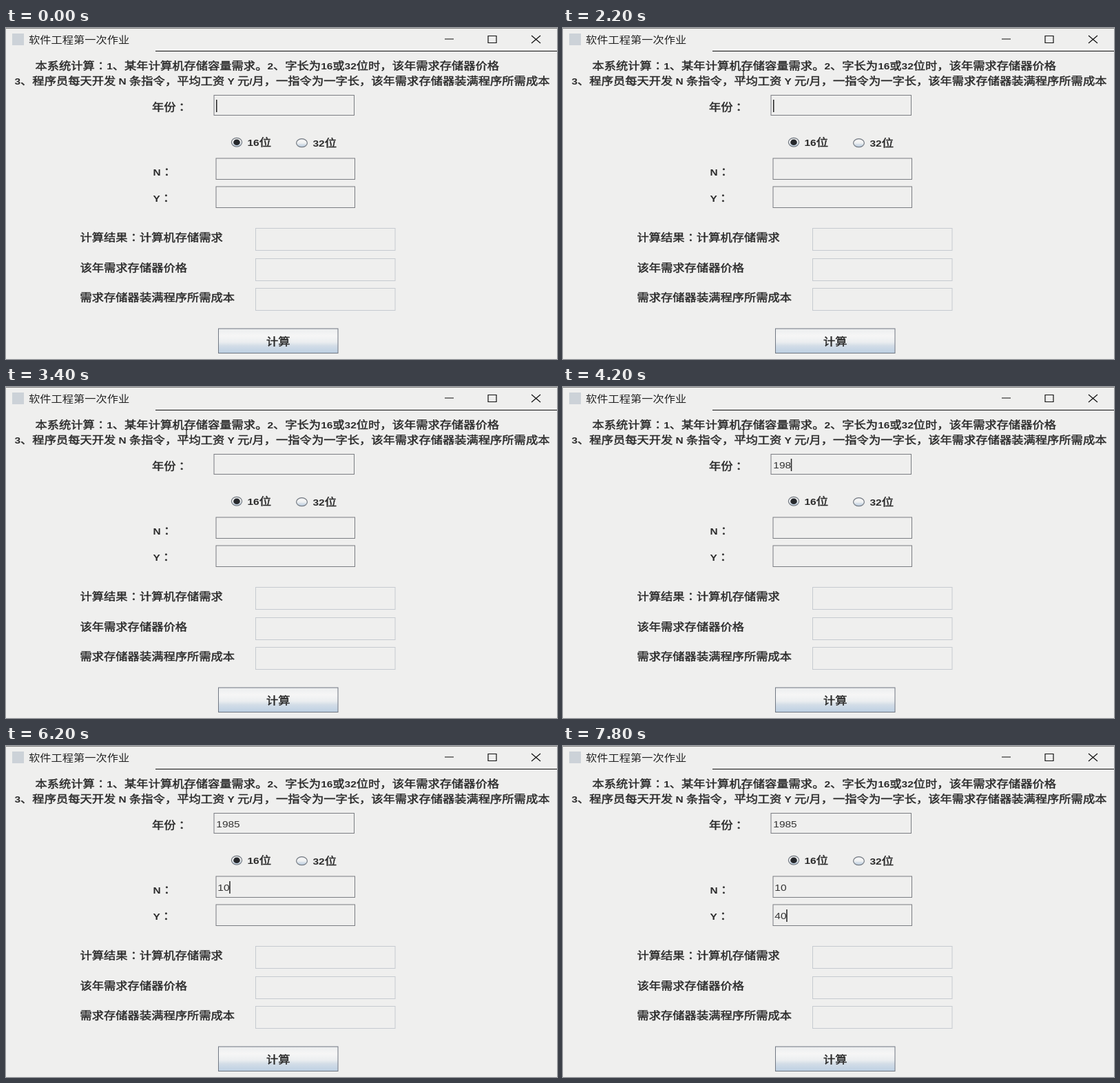
Animation, 800 px wide and 480 px high, one loop 8000 ms. Source, as an HTML page:

```html
<!DOCTYPE html>
<html lang="zh-CN">
<head>
<meta charset="utf-8">
<style>
  html, body { margin: 0; width: 100%; height: 100%; overflow: hidden; background: #efefee; }
  svg { display: block; width: 100%; height: 100%; }
  text { font: 400 15px "Noto Sans CJK SC", "Noto Sans CJK", sans-serif; fill: #2b2b2b; stroke: #2b2b2b; stroke-width: .45; white-space: pre; }
  .latin { font: 700 13.4px "Liberation Sans", Arial, sans-serif; stroke: none; }
  .colon { font-family: "Noto Sans CJK JP", sans-serif; }
  .title { font-size: 14.1px; fill: #222; stroke: none; }
  .value { font-weight: 400; fill: #333; }
  .value .latin { font-weight: 400; }
  .line { fill: none; stroke: #111; stroke-width: 1.2; }
  .field { fill: none; stroke: #7b7d82; }
  .result { fill: none; stroke: #c6cad0; }
</style>
</head>
<body>
<svg id="stage" viewBox="0 0 800 480">
  <defs>
    <linearGradient id="metal" x2="0" y2="1">
      <stop stop-color="#eceeef"/>
      <stop offset=".3" stop-color="#f6f6f6"/>
      <stop offset=".55" stop-color="#ebeef0"/>
      <stop offset=".7" stop-color="#d3dde7"/>
      <stop offset="1" stop-color="#bccfe2"/>
    </linearGradient>
  </defs>
  <rect width="800" height="480" fill="#efefee"/>
  <path class="line" d="M0 0H800M217 33.5H800M637 16H650M700 11.5H712V21.5H700ZM763 11L776 22M776 11L763 22"/>
  <rect x="9" y="8" width="17" height="17" fill="#ccd2d8"/>
  <g id="boxes"></g>
  <rect x="308.5" y="436" width="173.5" height="35.5" fill="url(#metal)" stroke="#707782"/>
  <g fill="url(#metal)" stroke="#747a82" stroke-width="1.2">
    <ellipse cx="335" cy="165.7" rx="7.6" ry="6.4"/>
    <ellipse cx="429.5" cy="166.7" rx="7.9" ry="6"/>
  </g>
  <ellipse cx="335" cy="165.7" rx="4.8" ry="4.3" fill="#26282c"/>
  <g id="labels"></g>
  <rect id="caret" width="1.5" height="18" fill="#222"/>
  <path id="pointer" d="M259 61.5H261L262 62.5L263 61.5H265M262 62.5V72.5M259 73H265" fill="none" stroke="#222" stroke-width="1.2"/>
</svg>
<script>
const $ = id => document.getElementById(id);
const STRETCH = 1.153, DIGIT = 8.6, LOOP = 8000;

function addText(x, y, string, className = '') {
  const node = document.createElementNS('http://www.w3.org/2000/svg', 'text');
  node.setAttribute('transform', `translate(${x} ${y}) scale(${STRETCH} 1)`);
  node.setAttribute('class', className);
  node.innerHTML = string
    .replace(/[\x20-\x7e]+/g, '<tspan class="latin">$&</tspan>')
    .replace(/：/g, '<tspan class="colon" lang="ja">：</tspan>');
  $('labels').append(node);
  return node;
}

addText(33, 22, '软件工程第一次作业', 'title');
[
  [42.5, 60.3, '本系统计算：1、某年计算机存储容量需求。2、字长为16或32位时，该年需求存储器价格'],
  [12.5, 81.8, '3、程序员每天开发 N 条指令，平均工资 Y 元/月，一指令为一字长，该年需求存储器装满程序所需成本'],
  [212, 120, '年份：'],
  [350.5, 171, '16位'],
  [445.5, 172, '32位'],
  [213.5, 214, 'N：'],
  [213.5, 251.5, 'Y：'],
  [107.5, 309, '计算结果：计算机存储需求'],
  [107.5, 352.5, '该年需求存储器价格'],
  [107.5, 396, '需求存储器装满程序所需成本'],
  [378, 459.5, '计算']
].forEach(label => addText(...label));

const box = (x, y, w, h, kind) => `<rect class="${kind}" x="${x}" y="${y}" width="${w}" height="${h}"/>`;
$('boxes').innerHTML =
  box(302, 97.5, 203.5, 29, 'field') +
  [189, 230].map(y => box(305, y, 201.5, 30.5, 'field')).join('') +
  [290.5, 334.5, 377.5].map(y => box(362.5, y, 202.5, 32, 'result')).join('');

const fields = [[305.3, 117.7], [307.3, 209.7], [307.3, 250.7]].map(([x, y]) => {
  const node = addText(x, y, '', 'value latin');
  return { x, y, node };
});

// Each entry: time, focused field, its content
const events = [
  [-100, 0, ''], [3600, 0, '1'], [4000, 0, '19'], [4200, 0, '198'], [4400, 0, '1985'],
  [5200, 1, ''], [5800, 1, '1'], [6000, 1, '10'],
  [6400, 2, ''], [7000, 2, '4'], [7400, 2, '40']
];

function draw(t) {
  const values = ['', '', ''];
  let last;
  for (const event of events) {
    if (event[0] > t) break;
    last = event;
    values[event[1]] = event[2];
  }
  fields.forEach((field, i) => field.node.textContent = values[i]);

  const [since, focus, value] = last;
  const { x, y } = fields[focus];
  $('caret').setAttribute('x', x + value.length * DIGIT - .3);
  $('caret').setAttribute('y', y - 13.7);
  $('caret').setAttribute('opacity', (t - since) % 1000 < 500 ? 1 : 0);
  $('pointer').setAttribute('opacity', t < 600 ? 0 : 1);
}

const start = performance.now();
function frame() {
  draw((performance.now() - start) % LOOP);
  requestAnimationFrame(frame);
}
frame();
</script>
</body>
</html>
```
